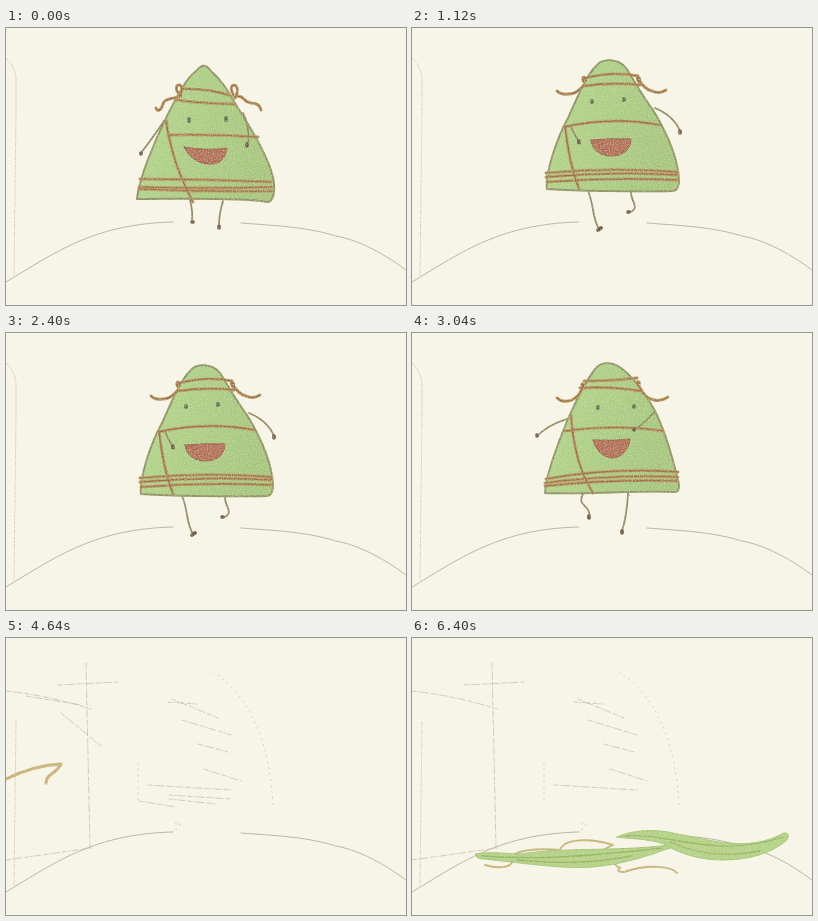
Recreate the animation shown at these times as an HTML page without scripts. Size 400 by 277 pixels, loop 7.36 s.

```html
<!DOCTYPE html>
<html lang="en">
<head>
<meta charset="utf-8">
<title>Dancing dumpling</title>
<style>
html, body { margin: 0; width: 100%; height: 100%; overflow: hidden; background: #f7f5e7; }
svg { display: block; width: 100%; height: 100%; }
path { fill: none; stroke-linecap: round; stroke-linejoin: round; }

/* each part holds its poses: a = stand, b = hop left, c = hop right */
.pose { d: var(--a); animation: dance 7.36s step-end infinite; }
@keyframes dance {
  0%, 8.695%, 17.391%, 26.086%, 34.782% { d: var(--a); animation-timing-function: steps(3); }
  6.521%, 23.913%, 41.304% { d: var(--b); }
  15.217%, 32.608% { d: var(--c); }
  43.478% { d: var(--a); }
  45.652% { d: var(--b); }
  47.826%, 100% { d: var(--a); }
}
.figure { animation: leave 7.36s step-end infinite; }
@keyframes leave {
  0% { transform: none; visibility: visible; }
  50% { transform: translate(-4px, 1px); visibility: visible; }
  56.521% { transform: translate(-182px, -2px); visibility: visible; }
  58.695%, 100% { transform: translate(-300px, 0); visibility: hidden; }
}

.body {
  fill: url(#skin); stroke: #8c8d60; stroke-width: 1.9;
  --a: path("M131 171C133 150 150 110 161 88C169 72 180 50 190 43C196 36 200 36 205 43C213 50 222 62 230 77C245 100 266 135 268 155C269 165 267 173 262 174C235 169 170 171 131 171Z");
  --b: path("M133 160C134 140 146 110 156 86C164 68 174 46 185 34C190 29 199 29 206 33C220 42 233 60 243 78C254 100 262 130 267 152C267 158 266 159 262 159C230 157 165 162 133 160Z");
  --c: path("M135 161C133 145 145 110 156 90C165 70 174 48 184 38C190 30 206 30 214 40C222 52 230 68 241 82C255 105 266 130 267 152C267 160 265 163 260 163C230 164 165 163 135 161Z");
}
.string {
  --a: path("M177 61Q200 60 223 67M170 72Q200 76 229 76M162 107Q205 106 252 109M134 151Q200 151 265 154M133 161Q200 164 266 163M133 159Q200 161 266 159M160 92Q166 135 187 174M172 69C160 72 158 72 157 76C155 83 151 84 150 80M231 68C240 68 236 74 245 75C251 75 254 77 255 82M175 68C168 62 170 56 174 57C177 59 176 64 173 69M228 68C223 60 226 55 230 58C233 61 231 66 229 70");
  --b: path("M172 48Q200 48 225 45M168 55Q200 53 228 58M153 98Q205 91 251 98M134 146Q200 134 266 139M133 153Q200 146 266 148M133 150Q200 141 266 144M159 82Q162 130 181 160M170 55C168 63 160 68 156 68C150 69 147 67 145 65M227 53C231 62 236 66 242 67C249 69 253 66 256 64M171 54C169 52 170 50 171 51C172 51 172 53 171 54M226 52C224 50 225 48 227 49C228 50 227 52 226 52");
  --c: path("M174 50Q200 43 226 48M172 58Q200 54 228 57M152 99Q200 88 248 97M134 145Q200 139 266 144M135 154Q200 149 266 152M134 149Q200 143 266 147M153 98Q157 135 167 161M172 57C164 66 160 66 156 66C150 67 146 64 145 63M226 50C230 58 236 62 240 63C246 66 251 64 254 62M172 54C170 52 171 49 172 49C174 50 174 53 172 54M227 54C225 52 225 49 226 49C228 50 228 52 227 54");
}
.ochre { stroke: #b3935b; stroke-width: 2.9; }
.brown { stroke: #9a6443; stroke-width: 1.2; }
.limbs {
  stroke: #8f805f; stroke-width: 1.7;
  --a: path("M158 93Q148 108 135 125M237 85Q244 98 242 116M184 172Q187 183 186 193M217 173Q213 186 213 198");
  --b: path("M155 86Q136 92 125 103M243 78Q233 90 222 97M171 161C164 174 180 172 177 184M216 160Q215 182 210 198");
  --c: path("M158 97Q162 106 167 114M243 80Q262 88 268 103M176 163C182 176 180 190 187 201M219 163C218 174 230 180 216 185");
}
.tips {
  stroke: #6a5241; stroke-width: 3.6;
  --a: path("M135 125v1M241 116v2M187 194h-1M213 198v2");
  --b: path("M125 102v1M222 96v1M177 183v2M210 198v2");
  --c: path("M167 113v2M268 103v2M189 200l-3 2M217 184h-1");
}
.eyes {
  stroke: #626a50; stroke-width: 3.8;
  --a: path("M183 91v2M220 90v2");
  --b: path("M186 74v1M222 73v1");
  --c: path("M180 73v1M212 71v1");
}
.mouth {
  fill: #b16955; stroke: #9a5443; stroke-width: 1;
  --a: path("M178 119Q200 123 221 120C220 130 213 137 204 136C192 136 183 129 178 119Z");
  --b: path("M181 107Q200 108 218 106C217 117 209 125 200 125C190 124 184 117 181 107Z");
  --c: path("M179 112Q199 110 219 111C219 121 211 128 200 128C188 128 180 122 179 112Z");
}

.after { visibility: hidden; }
.marks { animation: show 7.36s step-end infinite; }
@keyframes show { 0% { visibility: hidden; } 58.695%, 100% { visibility: visible; } }
.brief { animation: brief 7.36s step-end infinite; }
@keyframes brief { 0%, 80.434%, 100% { visibility: hidden; } 58.695% { visibility: visible; } }
.corner { animation: corner 7.36s step-end infinite; }
@keyframes corner { 0% { visibility: visible; } 58.695%, 100% { visibility: hidden; } }

.rope {
  stroke: #c8b079; animation: rope 7.36s step-end infinite;
  --a: path("M-150 190C-140 186 -130 183 -120 180C-110 177 -100 174 -90 170C-80 167 -70 163 -60 160C-50 157 -40 154 -30 151C-20 147 -10 144 0 141C18 132 38 127 55 126C50 136 40 136 40 145");
  --b: path("M0 140C10 128 20 118 32 112C45 105 58 98 72 93C85 88 98 84 112 81C126 78 140 76 152 78C165 80 176 86 186 93C196 100 203 109 206 118C208 128 200 135 195 140");
  --c: path("M73 227C90 232 102 228 100 222C98 212 125 210 150 214C200 220 205 232 160 228C130 222 100 228 105 218C130 210 190 212 207 220C212 228 200 234 212 234C235 226 260 228 265 235");
  --e: path("M73 227C90 232 102 228 100 222C98 212 125 210 148 212C152 200 180 200 201 207C170 222 160 226 160 222C150 215 190 212 207 230C212 228 200 234 212 234C235 226 260 228 265 235");
}
@keyframes rope {
  0% { visibility: hidden; d: var(--a); stroke-width: 3; }
  63.043% { visibility: visible; d: var(--a); stroke-width: 3; animation-timing-function: steps(2); }
  67.391% { visibility: visible; d: var(--b); stroke-width: 2.6; animation-timing-function: steps(2); }
  71.739% { visibility: visible; d: var(--c); stroke-width: 1.9; }
  82.608%, 100% { visibility: visible; d: var(--e); stroke-width: 1.9; }
}

.leaf { fill: #b1d184; stroke: #a3c074; stroke-width: 1; }
.vein { stroke: #93b164; stroke-width: 1.3; }
.first { animation: first 7.36s step-end infinite; }
.leaf.first {
  --a: path("M106 223C112 217 125 214 135 208C165 198 215 205 297 200C302 201 301 205 297 207C265 210 240 217 220 219C190 221 160 218 113 227C109 228 106 226 106 223Z");
  --b: path("M64 216C80 213 95 216 110 216C150 209 200 214 258 207C264 207 262 209 258 210C240 216 215 226 180 229C150 231 120 226 72 221C66 221 63 219 64 216Z");
}
.vein.first {
  --a: path("M112 223C150 212 200 214 294 204M128 220C170 213 210 216 250 211");
  --b: path("M70 218C120 222 170 219 250 210M105 222C150 226 180 225 220 218");
}
@keyframes first {
  0% { visibility: hidden; d: var(--a); transform: translate(-262px, -112px); }
  71.739% { visibility: visible; d: var(--a); transform: translate(-262px, -112px); animation-timing-function: steps(3); }
  78.26% { visibility: visible; d: var(--a); transform: translate(0, 0); animation-timing-function: steps(4); }
  86.956%, 100% { visibility: visible; d: var(--b); transform: translate(0, 0); }
}
.second { animation: second 7.36s step-end infinite; }
.leaf.second {
  --a: path("M-150 62C-130 50 -110 46 -90 44C-50 35 0 36 33 35C38 36 38 39 35 41C20 42 10 45 -5 48C-50 60 -80 62 -110 66C-130 68 -150 66 -150 62Z");
  --b: path("M205 199C225 190 250 192 265 196C300 202 335 215 372 195C378 195 377 199 374 203C360 214 340 222 310 222C285 222 265 214 252 206C235 200 215 201 205 199Z");
}
.vein.second {
  --a: path("M-145 61C-90 50 -20 42 32 38M-90 56C-60 50 -30 45 0 43");
  --b: path("M213 198C260 194 300 222 371 199M258 204C285 216 315 220 348 213");
}
@keyframes second {
  0% { visibility: hidden; d: var(--a); }
  78.26% { visibility: visible; d: var(--a); animation-timing-function: steps(4); }
  86.956%, 100% { visibility: visible; d: var(--b); }
}
</style>
</head>
<body>
<svg viewBox="0 0 400 277" preserveAspectRatio="none">
  <linearGradient id="skin" x1="0" x2="1" y1="0" y2=".3">
    <stop stop-color="#b5d88f"/>
    <stop offset=".45" stop-color="#abce84"/>
    <stop offset="1" stop-color="#a4c47c"/>
  </linearGradient>
  <filter id="crayon" filterUnits="userSpaceOnUse" x="-200" y="0" width="620" height="277" color-interpolation-filters="sRGB">
    <feTurbulence type="fractalNoise" baseFrequency=".8" numOctaves="2" seed="4" result="noise"/>
    <feDisplacementMap in="SourceGraphic" in2="noise" scale="1.4" xChannelSelector="R" yChannelSelector="G" result="rough"/>
    <feColorMatrix in="noise" values="0 0 0 0 .85  0 0 0 0 .9  0 0 0 0 .72  1.3 0 0 0 -.5"/>
    <feComposite operator="in" in2="rough" result="grain"/>
    <feMerge><feMergeNode in="rough"/><feMergeNode in="grain"/></feMerge>
  </filter>

  <g stroke="#a39d84" stroke-width=".7" stroke-dasharray="5 .7 2 1 8 .6">
    <path d="M0 254C50 224 88 196 167 194"/>
    <path d="M235 195C275 198 300 199 330 208Q362 214 400 242"/>
  </g>
  <g stroke="#cbc5af" stroke-width=".7" stroke-dasharray="3 1.5 1 2">
    <path class="corner" d="M0 30Q10 40 10 52V84"/>
    <path d="M10 84L8 248"/>
  </g>

  <g class="after marks" stroke="#c3baa0" stroke-width=".7" stroke-dasharray="4 2 1 2 7 3">
    <path d="M80 25L84 210M0 222L85 210M0 53Q45 58 85 71M52 47L112 44"/>
    <path d="M162 64L191 66M166 61L212 80M176 82L225 97M192 106L222 114M198 131L235 143M142 147L225 152"/>
    <path stroke-dasharray="1 5" d="M207 34Q262 70 267 168M132 125V165M170 192V185H174V192"/>
  </g>
  <path class="after brief" stroke="#c3baa0" stroke-width=".7" stroke-dasharray="4 2 1 2 7 3" d="M20 58L75 67M55 75L95 108M163 157L225 161M163 161L210 166M133 163L170 169"/>

  <g class="figure" filter="url(#crayon)">
    <path class="pose body"/>
    <path class="pose string ochre"/>
    <path class="pose string brown"/>
    <path class="pose limbs"/>
    <path class="pose tips"/>
    <path class="pose eyes"/>
    <path class="pose mouth"/>
  </g>

  <g filter="url(#crayon)">
    <path class="after rope"/>
    <path class="after leaf first"/>
    <path class="after vein first"/>
    <path class="after leaf second"/>
    <path class="after vein second"/>
  </g>
</svg>
</body>
</html>
```
